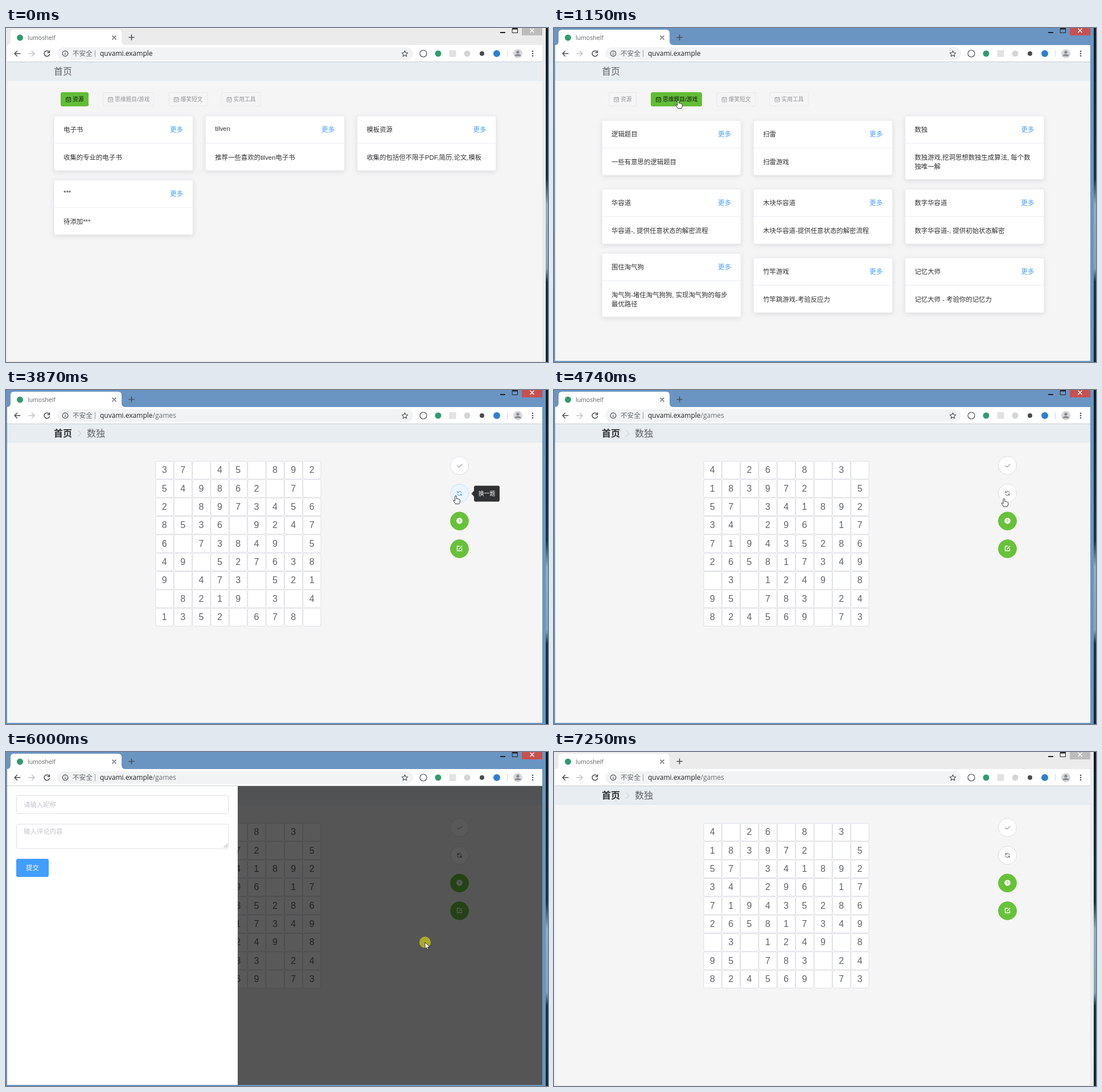
Write an HTML page that moves like this. It is 952 px wide and 588 px high and loops after 7.4 s.

```html
<!DOCTYPE html>
<html lang="zh-CN">
<head>
<meta charset="utf-8">
<title>lumoshelf</title>
<style>
html, body { margin: 0; width: 100%; height: 100%; overflow: hidden; background: #ebebeb; }
#stage { display: block; width: 952px; height: 588px; }
text { font-family: "Liberation Sans", "Noto Sans CJK SC", "Noto Sans CJK", sans-serif; white-space: pre; }
.ui { font-family: "Open Sans", "Noto Sans CJK SC", "Noto Sans CJK", sans-serif; }
.card { filter: drop-shadow(0 2px 4px rgba(0,0,0,.1)); }
.line { fill: none; stroke-linecap: round; stroke-linejoin: round; }
</style>
</head>
<body>
<svg id="stage" viewBox="0 0 952 588"></svg>
<script>
const LOOP = 7400;
const SITE = 'quvami.example', PATH = '/games';
const GREEN = '#67c23a', BLUE = '#409eff', INK = '#303133', GREY = '#606266', EDGE = '#dcdfe6';

// Drawing helpers; text is placed by its vertical centre.
const text = (x, cy, s, size, fill, attrs = '') =>
  `<text x="${x}" y="${cy + size * .37}" font-size="${size}" fill="${fill}" ${attrs}>${s}</text>`;
const rect = (x, y, w, h, fill, attrs = '') =>
  `<rect x="${x}" y="${y}" width="${w}" height="${h}" fill="${fill}" ${attrs}/>`;
const disc = (x, y, r, fill, attrs = '') => `<circle cx="${x}" cy="${y}" r="${r}" fill="${fill}" ${attrs}/>`;
const line = (d, stroke, width = 1, attrs = '') =>
  `<path class="line" d="${d}" stroke="${stroke}" stroke-width="${width}" ${attrs}/>`;
const group = (id, body, attrs = '') => `<g id="${id}" ${attrs}>${body}</g>`;

function browser() {
  const dark = '#4b4f54';
  const tab = 'M2 30Q8 30 8 23V9Q8 3 14 3H197Q203 3 203 9V23Q203 30 209 30Z';
  return rect(0, 0, 952, 588, '#ebebeb', 'id="frame"') +
    rect(948, 0, 4, 588, 'url(#desktop)') +
    `<path d="${tab}" fill="#fff"/>` + disc(24.5, 17, 5.5, '#2f9c70') +
    text(38, 17, 'lumoshelf', 10.5, '#5f6368', 'class="ui"') +
    line('M187 14l6 6M193 14l-6 6', dark, 1.3) +
    line('M220.5 12v9M216 16.5h9', dark, 1.6) +
    rect(868, 7, 9, 2, '#222') +
    line('M889.5 1.5h9v7h-9z', '#222') + rect(889, 0, 10, 2.5, '#222') +
    rect(906, 0, 36, 13, '#bcbcbc', 'id="close"') + line('M921 1.5l6 6M927 1.5l-6 6', '#fff', 1.5) +
    rect(2, 30, 940, 30, '#fff') + rect(2, 59, 940, 1, '#c9d2d8') +
    line('M25 45H15M19.5 40.5L15 45l4.5 4.5', dark, 1.5) +
    line('M40 45h10M45.5 40.5L50 45l-4.5 4.5', '#bfc1c4', 1.5) +
    line('M75.5 41.8A4.8 4.8 0 1 0 76.5 46.5M76.5 40v3.5H73', dark, 1.5) +
    rect(90, 34, 625, 22, '#f1f3f4', 'rx="11"') +
    disc(104, 45, 4.8, 'none', `stroke="${dark}" stroke-width="1.2"`) +
    line('M104 44.5v3M104 42.3v.1', dark, 1.2) +
    text(117, 45, '不安全', 11.6, '#5f6368', 'class="ui"') + rect(156, 39, 1, 12, '#9a9da1') +
    text(165, 45, `${SITE}<tspan id="path" fill="#6a6e73">${PATH}</tspan>`, 12, '#202124', 'class="ui"') +
    line('M700.5 40l1.5 3.5 3.7.3-2.8 2.5.9 3.7-3.3-2-3.3 2 .9-3.7-2.8-2.5 3.7-.3z', dark, 1.1) +
    disc(733, 45, 6, 'none', `stroke="${dark}" stroke-width="1.2"`) +
    disc(759, 45, 5.5, '#2f9c70') + rect(778.5, 39, 12, 12, '#e2e2e2') +
    disc(810, 45, 5.5, '#d4d4d4') + disc(836, 45, 4, '#4a4a4a') + disc(862, 45, 6, '#2f7fd0') +
    rect(880, 39, 1, 12, '#d0d3d6') +
    disc(899, 45, 8, '#d5d7da') + disc(899, 42.5, 2.6, '#85898e') +
    '<path d="M893.5 49.5q0-3.5 5.5-3.5t5.5 3.500z" fill="#85898e"/>' +
    [41, 45, 49].map(y => disc(925, y, 1.3, dark)).join('');
}

function tabButton([x, w, label], i) {
  const calendar = `M${x + 10} 122.5h7.500v7.500h-7.500zm0 2.5h7.500m-5.500-3.500v1.500m3.500-1.500v1.500m-3.500 4.500h3.500`;
  return group('tab' + i,
    rect(x + .5, 113.5, w - 1, 24, '#f5f5f5', 'rx="2.5"') +
    `<path class="line" d="${calendar}" stroke-width=".8"/>` +
    text(x + 21, 125.7, label, 9.75, '#909399'));
}

function card(column, y, title, ...body) {
  const x = 84.5 + column * 266.2, height = 80.5 + body.length * 15.5;
  const isAscii = /^[ -~]+$/.test(title);
  return rect(x, y, 243.5, height, '#fff', 'rx="3" stroke="#ebeef5" stroke-width=".8" class="card"') +
    rect(x, y + 47.5, 243.5, 1, '#ebeef5') +
    text(x + 16.5, y + (isAscii ? 21.5 : 23.5), title, 11.4, INK) +
    text(x + 203.5, y + 23.5, '更多', 11.5, BLUE) +
    body.map((s, i) => text(x + 16.5, y + 73 + i * 15.5, s, 11.4, INK)).join('');
}

const resources = [
  [0, 155, '电子书', '收集的专业的电子书'],
  [1, 155, 'tilven', '推荐一些喜欢的tilven电子书'],
  [2, 155, '模板资源', '收集的包括但不限于PDF,简历,论文,模板'],
  [0, 268, '***', '待添加***']
];
const games = [
  [0, 163, '逻辑题目', '一些有意思的逻辑题目'],
  [1, 163, '扫雷', '扫雷游戏'],
  [2, 155, '数独', '数独游戏,挖洞思想数独生成算法, 每个数', '独唯一解'],
  [0, 284, '华容道', '华容道-, 提供任意状态的解密流程'],
  [1, 284, '木块华容道', '木块华容道-提供任意状态的解密流程'],
  [2, 284, '数字华容道', '数字华容道-, 提供初始状态解密'],
  [0, 397, '围住淘气狗', '淘气狗-堵住淘气狗狗, 实现淘气狗的每步', '最优路径'],
  [1, 405, '竹竿游戏', '竹竿跳游戏-考验反应力'],
  [2, 405, '记忆大师', '记忆大师 - 考验你的记忆力']
];
const puzzles = [
  '37 45 892/549862 7 /2 8973456/8536 9247/6 73849 5/49 527638/9 473 521/ 8219 3 4/1352 678 ',
  '4 26 8 3 /183972  5/57 341892/34 296 17/719435286/265817349/ 3 1249 8/95 783 24/824569 73'
];
const PITCH = 32.35;

function board() {
  let cells = '';
  for (let i = 0; i < 81; i++)
    cells += rect(262.9 + i % 9 * PITCH, 125.4 + Math.floor(i / 9) * PITCH, 31.4, 31.4, '#fff', `rx="2.5" stroke="${EDGE}"`);
  return cells + puzzles.map((p, n) => group('digits' + n, p.split('/').map((row, r) =>
    [...row].map((d, c) => d === ' ' ? '' :
      text(278.3 + c * PITCH, 140.3 + r * PITCH, d, 16, GREY, 'text-anchor="middle"')).join('')).join(''))).join('');
}

const roundButton = (id, y, fill, stroke, icon) =>
  group(id, disc(796.5, y, 16, fill, `stroke="${stroke}"`) + icon);

const tooltip = (id, y, w, label) => group(id,
  rect(822, y - 14, w, 28, INK, 'rx="3"') +
  `<path d="M822 ${y - 5}l-4.5 5 4.5 5z" fill="${INK}"/>` + text(830, y, label, 9.75, '#fff'));

function sudoku() {
  return board() +
    roundButton('check', 133, '#fff', EDGE, line('M792.5 133l3 3 5.5-5.5', GREY)) +
    roundButton('refresh', 181.9, '#fff', EDGE,
      line('M793 180.5a4 4 0 0 1 7.3.5M800 183.5a4 4 0 0 1-7.3-.5M793 178v2.7h2.5M800 186v-2.7h-2.5', GREY, 1, 'id="arrows"')) +
    roundButton('help', 230.7, GREEN, GREEN, disc(796.5, 230.3, 5.3, '#fff') +
      text(796.5, 230.5, '?', 8, GREEN, 'text-anchor="middle" font-weight="bold"')) +
    roundButton('edit', 279.5, GREEN, GREEN,
      line('M797 275h-4.5v8h8v-4M796 280l4.7-5', '#fff', 1.3)) +
    tooltip('refreshTip', 182.5, 45, '换一题') + tooltip('editTip', 279.5, 35, '评论');
}

function drawer() {
  const field = (y, h) => rect(18.5, y, 372, h, '#fff', `rx="3" stroke="${EDGE}"`);
  return rect(2, 60, 405, 526, '#fff') +
    field(76.5, 32) + text(31, 92.7, '请输入昵称', 11.4, '#c0c4cc') +
    field(127, 43) + text(31, 139.7, '输入评论内容', 11.4, '#c0c4cc') +
    line('M383 168l6-6M386.5 168l2.5-2.5', '#777', .8) +
    rect(18, 188, 57, 32, BLUE, 'rx="3"') + text(46.5, 204, '提交', 11.4, '#fff', 'text-anchor="middle"');
}

const tabs = [[96, 49, '资源'], [170, 90, '思维题目/游戏'], [285.5, 69, '爆笑短文'], [378.5, 69, '实用工具']];
const stage = document.getElementById('stage');
stage.innerHTML = `<defs><linearGradient id="desktop" x2="0" y2="1">
  <stop offset="0" stop-color="#0b1c24"/><stop offset=".45" stop-color="#12343f"/>
  <stop offset=".53" stop-color="#8fb0c0"/><stop offset=".72" stop-color="#7fa6b8"/>
  <stop offset=".76" stop-color="#14343e"/><stop offset="1" stop-color="#0d2a33"/></linearGradient></defs>` +
  browser() +
  `<svg x="2" y="60" width="940" height="526" viewBox="2 60 940 526">` +
  rect(2, 60, 940, 526, '#f5f5f5') + rect(2, 60, 940, 33, '#e7edf1') +
  group('crumbHome', text(84, 76.5, '首页', 16, GREY)) +
  group('crumbGame', text(84, 76.5, '首页', 16, INK, 'font-weight="bold"') +
    line('M126.5 71l5.5 5.5-5.5 5.5', '#c0c4cc') + text(142, 76.5, '数独', 16, GREY)) +
  group('tabs', tabs.map(tabButton).join('')) +
  group('resources', resources.map(c => card(...c)).join('')) +
  group('games', games.map(c => card(...c)).join('')) +
  group('sudoku', sudoku()) +
  rect(2, 60, 940, 526, '#000', 'id="mask"') +
  group('status', rect(1.5, 567.5, 312, 20, '#fdfdfd', 'rx="2" stroke="#c8c8c8"') +
    text(4, 577, '', 10, '#777', 'id="statusText" class="ui"')) +
  group('drawer', drawer()) + '</svg>' +
  group('cursor', disc(0, 0, 10, '#ff0', 'id="press" opacity=".5"') +
    '<path id="arrow" d="M0 0V11.5L2.7 9 4.3 12.8 6.2 12 4.6 8.3H8.2Z" fill="#fff" stroke="#222" stroke-width=".9"/>' +
    '<path id="hand" d="M-1.3 8V1Q0-.8 1.3 1V5.5Q2.7 4.7 3.7 6 5 5.2 5.8 6.5 7.2 6 7.3 8V10.5Q7 12.5 6 14.5H-.5Q-2 12-4 9.5-4.3 7.5-2.7 8L-1.3 9.5Z" fill="#fff" stroke="#222" stroke-width=".9"/>');

const $ = id => document.getElementById(id);
const show = (id, on) => $(id).setAttribute('display', on ? 'inline' : 'none');
const paint = (el, attrs) => Object.entries(attrs).forEach(([k, v]) => el.setAttribute(k, v));
const within = (t, spans) => spans.some(([a, b]) => t >= a && t < b);
const ease = v => { v = Math.max(0, Math.min(1, v)); return v * v * (3 - 2 * v); };

// Cursor stops: time, x, y.
const route = [
  [70, 664, 512], [760, 218, 127], [1150, 218, 127], [1600, 831, 176], [1850, 831, 176],
  [2320, 729, 344], [3090, 729, 344], [3790, 787, 190], [3870, 790, 186], [4650, 790, 186],
  [5300, 797, 275], [5540, 797, 275], [5920, 736, 335], [6160, 736, 335], [6700, 722, 590]
];
const hands = [[690, 1230], [1560, 1920], [3770, 4780], [4860, 5080], [5180, 5400]];
const presses = [[830, 960], [1760, 1880], [4020, 4180], [5300, 5430], [5920, 6160]];

function cursorAt(t) {
  const next = route.findIndex(k => k[0] > t);
  if (next < 1) return route[next < 0 ? route.length - 1 : 0].slice(1);
  const [a, x0, y0] = route[next - 1], [b, x1, y1] = route[next];
  const p = ease((t - a) / (b - a));
  return [x0 + (x1 - x0) * p, y0 + (y1 - y0) * p];
}

function paintTab(i, fill, edge, ink) {
  const [box, icon, label] = $('tab' + i).children;
  paint(box, { fill, stroke: edge });
  paint(icon, { stroke: ink });
  paint(label, { fill: ink });
}

function render(t) {
  const focused = t >= 830 && t < 7250;
  paint($('frame'), { fill: focused ? '#6a95c2' : '#ebebeb' });
  paint($('close'), { fill: focused ? '#c75050' : '#bcbcbc' });

  const home = t < 2470, selected = t < 830 ? 0 : 1;
  show('path', t >= 1850);
  show('crumbHome', home);
  show('crumbGame', !home);
  show('tabs', home);
  show('resources', t < 830);
  show('games', home && t >= 830);
  tabs.forEach((_, i) => {
    if (i === selected) paintTab(i, '#62bd37', '#62bd37', '#10180c');
    else if (i === 1 && t >= 690) paintTab(i, '#909399', '#909399', '#fff');
    else paintTab(i, '#f5f5f5', '#e9e9eb', '#909399');
  });

  show('sudoku', t >= 2540);
  show('digits0', t >= 2630 && t < 4180);
  show('digits1', t >= 4180);
  const onRefresh = within(t, [[3860, 4720]]), onEdit = within(t, [[5180, 5560]]);
  paint($('refresh').firstChild, { fill: onRefresh ? '#ecf5ff' : '#fff', stroke: onRefresh ? '#c6e2ff' : EDGE });
  paint($('arrows'), { stroke: onRefresh ? BLUE : GREY });
  paint($('edit').firstChild, { fill: onEdit ? '#5daf34' : GREEN, stroke: onEdit ? '#5daf34' : GREEN });
  show('refreshTip', onRefresh);
  show('editTip', within(t, [[5260, 5600]]));

  show('status', within(t, [[1620, 2470], [5440, 5800]]));
  $('statusText').textContent = t < 3000 ? SITE + PATH : `正在等待 ${SITE} 的响应...`;

  const open = ease((t - 5530) / 320) - ease((t - 6160) / 320);
  show('mask', open > 0);
  show('drawer', open > 0);
  paint($('mask'), { opacity: .65 * open });
  paint($('drawer'), { transform: `translate(${-405 * (1 - open)} 0)` });

  const hand = within(t, hands);
  show('cursor', t >= 70 && t < 6700);
  show('hand', hand);
  show('arrow', !hand);
  show('press', within(t, presses));
  paint($('cursor'), { transform: `translate(${cursorAt(t)})` });
}

function tick() {
  render(performance.now() % LOOP);
  requestAnimationFrame(tick);
}
tick();
</script>
</body>
</html>
```
